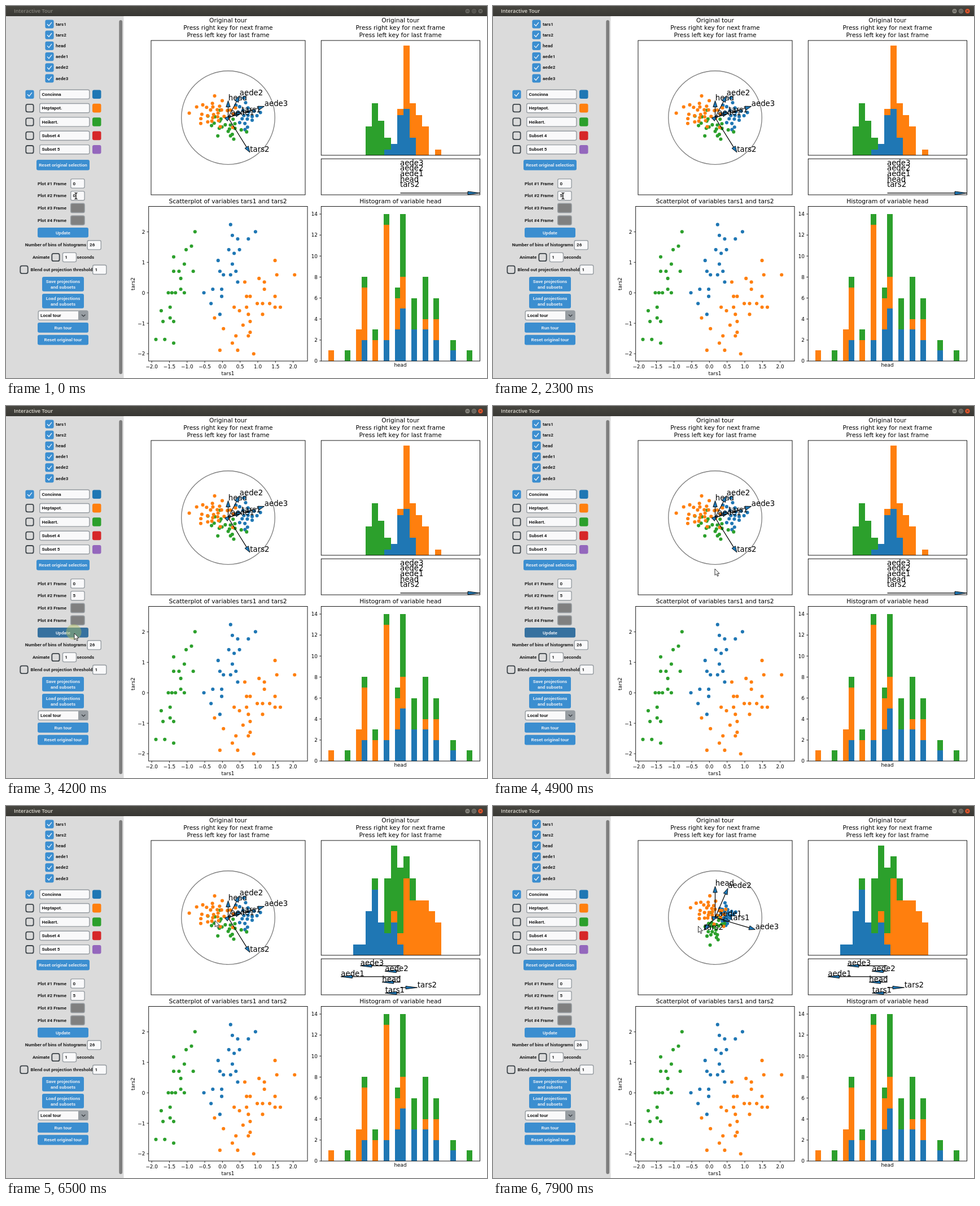
Recreate the animation shown at these times as an HTML page. Size 852x658 px, loop 8 s.

```html
<!DOCTYPE html>
<html lang="en">
<head>
<meta charset="utf-8">
<title>Interactive Tour</title>
<style>
html, body { margin: 0; width: 100%; height: 100%; overflow: hidden; background: #fff; }
svg { display: block; width: 852px; height: 658px; }
.ui { font: 600 8.1px Roboto, sans-serif; fill: #1c1c1c; }
.plot { font-family: "DejaVu Sans", sans-serif; fill: #000; }
.bar { font: 600 9.1px "Open Sans", sans-serif; }
</style>
</head>
<body>
<svg id="stage" viewBox="0 0 852 658"></svg>
<script>
const NS = 'http://www.w3.org/2000/svg';
const stage = document.getElementById('stage');
const BLUE = '#1f77b4', ORANGE = '#ff7f0e', GREEN = '#2ca02c';
const ACCENT = '#3b8ed0', HOVER = '#36719f', BORDER = '#979da2';
const COLORS = [BLUE, ORANGE, GREEN];

const set = (e, attrs) => { for (const k in attrs) e.setAttribute(k, attrs[k]); };
function add(parent, tag, attrs = {}, str) {
  const e = document.createElementNS(NS, tag);
  set(e, attrs);
  if (str !== undefined) e.textContent = str;
  parent.appendChild(e);
  return e;
}
const show = (e, on) => e.setAttribute('visibility', on ? 'visible' : 'hidden');
const group = () => add(stage, 'g');
const rect = (x, y, width, height, fill, more) =>
  add(stage, 'rect', { x, y, width, height, fill, ...more });
const line = (d, stroke = '#000', width = 0.8, parent = stage) =>
  add(parent, 'path', { d, stroke, fill: 'none', 'stroke-width': width });

/* ---------- title bar ---------- */
const grad = add(add(stage, 'defs'), 'linearGradient', { id: 'bar', x2: 0, y2: 1 });
add(grad, 'stop', { offset: 0, 'stop-color': '#474640' });
add(grad, 'stop', { offset: 1, 'stop-color': '#383733' });
rect(0, 0, 852, 18, 'url(#bar)');
const caption = add(stage, 'text', { class: 'bar', x: 14, y: 12 }, 'Interactive Tour');
const knobs = [817.5, 829, 840.5].map(cx =>
  add(stage, 'circle', { cx, cy: 9, r: 4.6, stroke: '#2f2e2a', 'stroke-width': 0.7 }));
line('M815.3 9h4.4M827 7.2h4v3.6h-4zM838.8 7.3l3.4 3.4m0-3.4l-3.4 3.4', '#34332f', 0.9);

/* ---------- side panel ---------- */
rect(0, 18, 208.5, 640, '#dbdbdb');
rect(200.3, 25, 5.8, 626, '#7e7e7e', { rx: 2.9 });

const label = (str, x, y, more) => add(stage, 'text', { class: 'ui', x, y, ...more }, str);
function check(cx, cy, on) {
  if (!on) {
    rect(cx - 6.7, cy - 6.7, 13.4, 13.4, 'none', { rx: 3, stroke: '#3e454a', 'stroke-width': 1.8 });
    return;
  }
  rect(cx - 7.6, cy - 7.6, 15.2, 15.2, ACCENT, { rx: 3 });
  line(`M${cx - 4} ${cy}l3 3.2 5-6.4`, '#eef3f8', 1.3);
}
function field(x, y, w, str, fill = '#f9f9fa') {
  rect(x + 0.7, y + 0.7, w - 1.4, 16.2, fill, { rx: 2.6, stroke: BORDER, 'stroke-width': 1.4 });
  return label(str, x + 4.5, y + 11.4);
}
function button(x, y, w, h, ...rows) {
  const box = rect(x, y, w, h, ACCENT, { rx: 3 });
  rows.forEach((s, i) => label(s, x + w / 2,
    y + h / 2 + 2.7 + (i - (rows.length - 1) / 2) * 10.2,
    { 'text-anchor': 'middle', style: 'fill:#e4ebf3' }));
  return box;
}

['tars1', 'tars2', 'head', 'aede1', 'aede2', 'aede3'].forEach((s, i) => {
  const y = 32 + i * 19.2;
  check(77, y, true);
  label(s, 88, y + 2.5);
});
[['Concinna', BLUE], ['Heptapot.', ORANGE], ['Heikert.', GREEN], ['Subset 4', '#d62728'], ['Subset 5', '#9467bd']]
  .forEach(([s, c], i) => {
    const y = 156.3 + i * 24.35;
    check(42, y, i === 0);
    field(59, y - 8.8, 89.5, s);
    rect(153, y - 7.8, 15.5, 15.6, c, { rx: 3 });
  });
button(54, 272, 94, 18.4, 'Reset original selection');

const frames = ['0', '0', '', ''].map((s, i) => {
  const y = 305.2 + i * 21.7;
  label(`Plot #${i + 1} Frame`, 56, y + 11.4);
  return field(114, y, 25.8, s, i > 1 ? '#808080' : undefined);
});
const entry = frames[1];
const caret = line('M0 330.5v10', '#000', 1);
const update = button(56, 392, 90, 17.6, 'Update');
label('Number of bins of histograms', 33.7, 425.4);
field(143.5, 414, 25.5, '26');
label('Animate', 47, 447);
check(88, 444.5);
field(99.7, 435.7, 25.5, '1');
label('seconds', 125.6, 447);
check(32, 466.4);
label('Blend out projection threshold', 43.5, 469);
field(153, 457.6, 25.5, '1');
button(64, 479, 74, 25.8, 'Save projections', 'and subsets');
button(64, 509, 74, 25.8, 'Load projections', 'and subsets');
field(56.5, 538.5, 89, 'Local tour');
rect(128, 538.5, 17.5, 17.6, BORDER, { rx: 2.6 });
line('M134 546l3.2 3 3.2-3', '#30353a', 1.2);
button(56, 560, 90, 17.8, 'Run tour');
button(56, 581.7, 90, 17.8, 'Reset original tour');

/* ---------- charts ---------- */
const text = (str, x, y, size, anchor = 'start', parent = stage) =>
  add(parent, 'text', { class: 'plot', x, y, 'font-size': size, 'text-anchor': anchor }, str);
const axes = (x, y, x2, y2) => rect(x, y, x2 - x, y2 - y, 'none', { stroke: '#000', 'stroke-width': 0.9 });

for (const x of [393.5, 698.7]) {
  ['Original tour', 'Press right key for next frame', 'Press left key for last frame']
    .forEach((s, i) => text(s, x, 28.7 + i * 13.2, 10.65, 'middle'));
}
text('Scatterplot of variables tars1 and tars2', 393, 348.9, 10.65, 'middle');
text('Histogram of variable head', 698.7, 348.9, 10.65, 'middle');

// Stacks the series; each one is [first bin, counts]
function bars(series, x0, w, base, unit, binOf = i => i) {
  const g = group(), tops = {};
  series.forEach(([first, counts], k) => counts.forEach((n, i) => {
    const bin = binOf(first + i), height = n * unit;
    const y = tops[bin] = (tops[bin] ?? base) - height;
    add(g, 'rect', { x: x0 + bin * w, y, width: w, height, fill: COLORS[k], 'shape-rendering': 'crispEdges' });
  }));
  return g;
}
// Whole-number measurements 0 to 15 fall into 26 bins
bars([[4, [2, 0, 2, 3, 5, 3, 3, 2, 0, 1]],
  [0, [1, 0, 0, 3, 5, 2, 11, 3, 3, 0, 1, 2]],
  [2, [1, 0, 1, 1, 1, 1, 6, 3, 4, 2, 0, 1, 0, 1]]],
  570.8, 9.82, 628, 18.57, v => Math.min(25, Math.floor(v * 26 / 15)));
const histA = bars([[5, [1, 2, 7, 8, 3]], [7, [1, 11, 6, 7, 5, 0, 1]], [2, [5, 9, 6, 2]]],
  614.5, 11.17, 264, 10.2);
const histB = bars([[0, [1, 1, 4, 6, 3, 2, 3, 1]], [6, [1, 1, 7, 5, 5, 5, 4, 3]], [3, [1, 0, 5, 6, 6, 2, 2]]],
  614.5, 11.17, 264, 19.4);

axes(257, 61, 530, 334);
axes(558.3, 61, 839.5, 264);
axes(558.3, 270.3, 839.5, 334);
axes(252.7, 354.5, 534, 628);
axes(558.3, 354.5, 839.5, 628);

const num = (v, d) => v.toFixed(d).replace('-', '\u2212');
function tickY(x, y, str) {
  line(`M${x} ${y}h-3.2`);
  text(str, x - 6.3, y + 3.3, 8.87, 'end');
}
for (let v = -2; v <= 2; v += 0.5) {
  const x = 383.4 + v * 62.6;
  line(`M${x} 628v3.2`);
  text(num(v, 1), x, 640.8, 8.87, 'middle');
}
for (let v = -2; v <= 2; v++) tickY(252.7, 507.3 - v * 53.9, num(v, 0));
for (let v = 0; v <= 14; v += 2) tickY(558.3, 628 - v * 18.57, v);
text('tars1', 393, 653, 8.87, 'middle');
text('head', 698.5, 638, 8.87, 'middle');
text('tars2', 0, 0, 8.87, 'middle').setAttribute('transform', 'translate(228 491.5) rotate(-90)');

/* ---------- point clouds ---------- */
let seed = 7;
function random() {
  seed = (seed + 0x6d2b79f5) | 0;
  let r = Math.imul(seed ^ (seed >>> 15), 1 | seed);
  r ^= r + Math.imul(r ^ (r >>> 7), 61 | r);
  return ((r ^ (r >>> 14)) >>> 0) / 4294967296;
}
// Evenly spread bell-shaped cloud of n points
function bell(n) {
  const turn = random();
  return Array.from({ length: n }, (_, i) => {
    const r = Math.sqrt(-2 * Math.log(1 - (i + 0.5) / (n + 2)));
    const a = i * 2.4 + turn * 6.28 + random() * 0.8;
    return [r * Math.cos(a), r * Math.sin(a)];
  });
}
// Places a unit point in a cloud given by centre, spreads and correlation
const place = ([u, v], [x, y, sx, sy, c]) => [x + sx * u, y + sy * (c * u + Math.sqrt(1 - c * c) * v)];
const dot = (fill, [cx, cy]) => add(stage, 'circle', { fill, cx, cy, r: 3.05 });

const species = [
  { n: 21, fill: BLUE, raw: [394, 462, 27, 48, -0.75], from: [426, 192, 14, 14, 0.1], to: [414, 192, 9, 10, 0] },
  { n: 22, fill: GREEN, raw: [300, 502, 20, 57, -0.7], from: [390, 213, 20, 14, 0.5], to: [392, 217, 10, 15, -0.2] },
  { n: 31, fill: ORANGE, raw: [435, 539, 34, 46, -0.55], from: [372, 189, 21, 15, 0.1], to: [386, 186, 16, 14, 0.3] }
];
const snap = (v, origin, step) => origin + Math.round((v - origin) / step) * step;
for (const s of species) {
  for (const p of bell(s.n)) {
    const [x, y] = place(p, s.raw);
    dot(s.fill, [snap(x, 265.5, 3.15), snap(y, 507.3, 6.35)]);
  }
}

const CX = 393.5, CY = 197.5;
add(stage, 'circle', { cx: CX, cy: CY, r: 82.8, fill: 'none', stroke: '#808080', 'stroke-width': 1.35 });
const cloud = species.flatMap(s => bell(s.n).map(p => {
  const a = place(p, s.from);
  return { a, b: place(p, s.to), e: dot(s.fill, a) };
}));

/* ---------- arrows ---------- */
function makeArrow(parent, name) {
  return {
    shaft: line('', '#000', 1.2, parent),
    tip: add(parent, 'path', { fill: BLUE, stroke: '#000', 'stroke-width': 0.9 }),
    name: text(name, 0, 0, 13.3, 'start', parent)
  };
}
function aim(arrow, x, y, x2, y2, size, half) {
  const len = Math.hypot(x2 - x, y2 - y) || 1, ux = (x2 - x) / len, uy = (y2 - y) / len;
  const bx = x2 - ux * size, by = y2 - uy * size;
  arrow.shaft.setAttribute('d', `M${x} ${y}L${bx} ${by}`);
  arrow.tip.setAttribute('d',
    `M${x2} ${y2}L${bx - uy * half} ${by + ux * half}L${bx + uy * half} ${by - ux * half}Z`);
  set(arrow.name, { x: x2 + 0.3, y: y2 - 0.7 });
}

// name, tip before, tip after
const tour = [
  ['tars1', 417, 188.5, 420, 203], ['tars2', 432, 259, 373.5, 219.5], ['head', 393.5, 167.5, 393.5, 142],
  ['aede1', 398, 193.5, 399, 195.5], ['aede2', 413.5, 159, 416, 145.5], ['aede3', 457.5, 177.5, 464.5, 218.5]
].map(([name, ...p]) => ({ p, arrow: makeArrow(stage, name) }));

const flatA = group(), flatB = group();
const rowY = i => 282.6 + i * 9.65;
['aede3', 'aede2', 'aede1', 'head', 'tars2'].forEach((s, i) => text(s, 698, rowY(i) - 0.8, 13.3, 'start', flatA));
aim(makeArrow(flatA, ''), 698.5, rowY(5), 839, rowY(5), 21, 2.9);
[['aede3', 627.5], ['aede2', 671], ['aede1', 593], ['head', 666], ['tars2', 728.5], ['tars1', 671.5]]
  .forEach(([s, x], i) => aim(makeArrow(flatB, s), 698.5, rowY(i), x, rowY(i), 20.5, 2.6));

/* ---------- pointer ---------- */
const ring = add(stage, 'circle', { fill: 'rgb(175,190,95)', 'fill-opacity': 0.45 });
const pointer = add(stage, 'path', {
  d: 'M0 0V11.3L2.6 9 4.5 13.1 6.3 12.3 4.5 8.3H8Z', fill: '#fff', stroke: '#1a1a1a', 'stroke-width': 0.9
});
const beam = group();
const beamPath = 'M-2.6-5.5Q0-5.5 0-4V4Q0 5.5-2.6 5.5M2.6-5.5Q0-5.5 0-4M0 4Q0 5.5 2.6 5.5';
line(beamPath, '#fff', 2.6, beam);
line(beamPath, '#000', 1.2, beam);

// Pointer moves: start, end, x, y
const moves = [
  [2700, 2800, 124, 331], [2900, 3400, 121, 402], [4600, 4900, 393, 288], [4900, 5900, 427, 253],
  [6100, 6600, 356, 190], [6600, 7100, 428, 257.5], [7200, 7300, 428, 254.5], [7600, 7900, 363.5, 212.5]
];
const progress = (t, a, b) => Math.min(1, Math.max(0, (t - a) / (b - a)));
const pointerAt = t => moves.reduce(([x, y], [a, b, x2, y2]) => {
  const k = progress(t, a, b);
  return [x + (x2 - x) * k, y + (y2 - y) * k];
}, [124, 336]);

/* ---------- timeline ---------- */
const LOOP = 8000, STEP = 100;
const FOCUS = 1300, ERASE = 1700, TYPE = 2300, REDRAW = 5000;
const caretOn = [[0, 400], [700, 1900], [2200, 2900], [3200, 3700], [5100, 5700]];
const clicks = [[600, 124, 336], [3900, 120, 399.7]];

function draw(t) {
  const focused = t >= FOCUS;
  caption.style.fill = focused ? '#dfdbd2' : '#85837c';
  knobs.forEach((k, i) => k.setAttribute('fill', !focused ? '#65645e' : i === 2 ? '#e2562c' : '#85837b'));

  const empty = t >= ERASE && t < TYPE;
  entry.textContent = empty ? '' : t < ERASE ? '0' : '5';
  set(caret, { transform: `translate(${empty ? 118.5 : 123.3} 0)` });
  show(caret, caretOn.some(([a, b]) => t >= a && t < b));

  const next = t >= REDRAW;
  update.setAttribute('fill', t >= 3300 && !next ? HOVER : ACCENT);
  [histA, flatA].forEach(g => show(g, !next));
  [histB, flatB].forEach(g => show(g, next));

  const w = progress(t, 7600, 7900);
  const mix = (a, b) => a + (b - a) * w;
  for (const { a, b, e } of cloud) set(e, { cx: mix(a[0], b[0]), cy: mix(a[1], b[1]) });
  for (const { p, arrow } of tour) aim(arrow, CX, CY, mix(p[0], p[2]), mix(p[1], p[3]), 11, 3.7);

  const hit = clicks.find(([at]) => t >= at && t < at + 800);
  show(ring, hit);
  if (hit) set(ring, { cx: hit[1], cy: hit[2], r: 4 + (t - hit[0]) * 0.032 });

  const [x, y] = pointerAt(t), inField = t < 3100;
  for (const e of [beam, pointer]) set(e, { transform: `translate(${x} ${y})` });
  show(beam, inField);
  show(pointer, !inField);
}

const start = performance.now();
let last = -1;
function tick() {
  const t = Math.floor(((performance.now() - start) % LOOP) / STEP) * STEP;
  if (t !== last) draw(last = t);
  requestAnimationFrame(tick);
}
tick();
</script>
</body>
</html>
```
